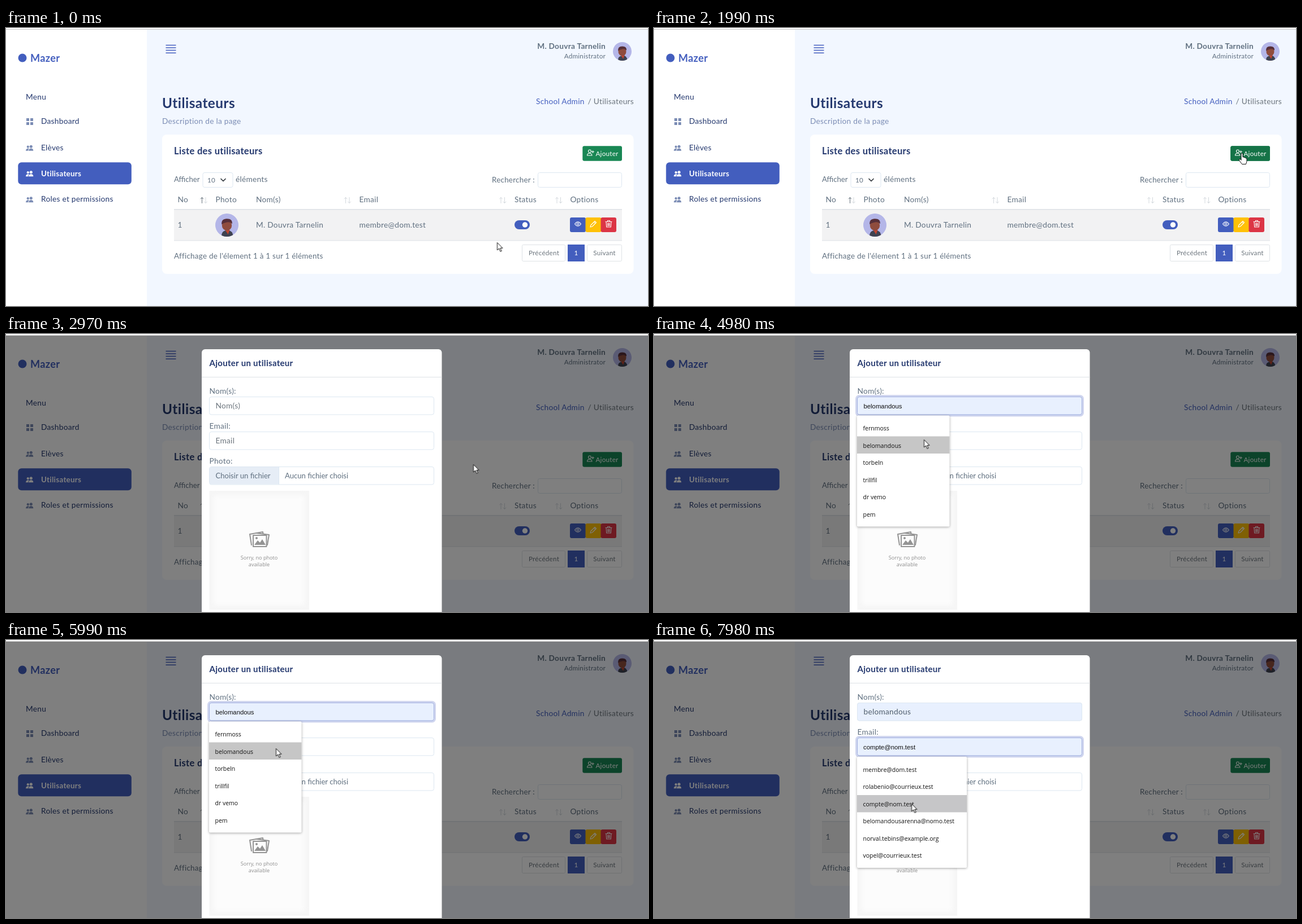
An HTML page for the animation above (8 s loop, 1135 by 493 pixels).

```html
<!DOCTYPE html>
<html lang="fr">
<head>
<meta charset="utf-8">
<title>Utilisateurs</title>
<style>
html, body { margin: 0; width: 100%; height: 100%; overflow: hidden; background: #f2f7ff; }
svg { display: block; }
#stage { width: 1135px; height: 493px; }
text { font: 13.7px Lato, sans-serif; letter-spacing: .02em; fill: #607080; white-space: pre; }
.bold { font-weight: 700; }
.nav { fill: #25396f; }
.blue { fill: #435ebe; }
.mute { fill: #7c8db5; }
.white { fill: #fff; }
.hint { fill: #6c757d; }
.end { text-anchor: end; }
.mid { text-anchor: middle; }
.h3 { font-size: 24.3px; }
.h4 { font-size: 16.5px; }
.h5 { font-size: 15px; }
.brand { font-size: 18.1px; }
.note { font-size: 13.4px; }
.file { font-size: 13.1px; letter-spacing: 0; }
.small { font-size: 11.7px; }
.native { font: 11.33px "Liberation Sans", Arial, sans-serif; letter-spacing: 0; fill: #111; }
.list text { font: 10.5px "Open Sans", sans-serif; letter-spacing: 0; fill: #111; }
.list > rect:first-child { fill: #fff; filter: drop-shadow(0 1px 2px rgba(0,0,0,.35)); }
.photo text { font: 9.1px "Open Sans", sans-serif; letter-spacing: 0; fill: #8d8d8d; }
.box { fill: #fff; stroke: #dce7f1; }
.page { fill: #fff; stroke: #dee2e6; }
.filled { fill: #e8f0fe; stroke: #dce7f1; }
.focus { fill: #e8f0fe; stroke: #a1afdf; }
.ring { fill: none; stroke: #435ebe; stroke-opacity: .25; stroke-width: 3.4; }
.line { fill: none; stroke-linecap: round; stroke-linejoin: round; }

/* every change is a hard cut */
.t { animation: 8s step-end infinite; }
#hover, #hand { animation-name: press; }
#modal { animation-name: modal; }
#beam { animation-name: beam; }
#click, #nameBlur { animation-name: click; }
#nameHint { animation-name: untilName; }
#namePick { animation-name: namePick; }
#nameDone, #mailList { animation-name: mail; }
#mailHint { animation-name: untilMail; }
#mailPick, #mailMark { animation-name: mailPick; }
#arrow { animation-name: arrow; }
@keyframes press { 0% { opacity: 0 } 24.875% { opacity: 1 } 37.125%, 100% { opacity: 0 } }
@keyframes modal { 0% { opacity: 0 } 37.125%, 100% { opacity: 1 } }
@keyframes untilName { 0% { opacity: 1 } 62.25%, 100% { opacity: 0 } }
@keyframes namePick { 0% { opacity: 0 } 62.25% { opacity: 1 } 87.375%, 100% { opacity: 0 } }
@keyframes mail { 0% { opacity: 0 } 87.375%, 100% { opacity: 1 } }
@keyframes click { 0% { opacity: 0 } 87.375% { opacity: 1 } 99.75%, 100% { opacity: 0 } }
@keyframes untilMail { 0% { opacity: 1 } 99.75%, 100% { opacity: 0 } }
@keyframes mailPick { 0% { opacity: 0 } 99.75%, 100% { opacity: 1 } }
@keyframes beam {
  0% { transform: translate(-50px, 0) }
  49.625% { transform: translate(500px, 127px) }
  62.25% { transform: translate(-50px, 0) }
  87.375% { transform: translate(455.5px, 185px) }
  99.75%, 100% { transform: translate(-50px, 0) }
}
@keyframes arrow {
  0% { transform: translate(868.5px, 380px) }
  12.5% { transform: translate(979.5px, 143px) }
  24.875% { transform: translate(-50px, 0) }
  37.125% { transform: translate(826.5px, 231px) }
  49.625% { transform: translate(-50px, 0) }
  62.25% { transform: translate(477.5px, 187px) }
  74.875% { transform: translate(477.5px, 192px) }
  87.375% { transform: translate(-50px, 0) }
  99.75%, 100% { transform: translate(455.5px, 290px) }
}
</style>
</head>
<body>
<svg id="stage" viewBox="0 0 1135 493">
<defs>
  <symbol id="people" viewBox="0 0 16 16">
    <circle cx="11" cy="5" r="3"/><path d="M6 14c0-7 10-7 10 0zM5.2 14c-.1-2 .6-3.6 1.8-4.7C4 8.3 0 9.6 0 14z"/><circle cx="4.5" cy="5.5" r="2.5"/>
  </symbol>
  <symbol id="avatar" viewBox="0 0 40 40">
    <clipPath id="round"><circle cx="20" cy="20" r="20"/></clipPath>
    <g clip-path="url(#round)">
      <rect width="40" height="40" fill="#b4b6e8"/>
      <path d="M11 40Q10 30 20 29T31 40z" fill="#3f4250"/>
      <path d="M17 28h8l-3 8z" fill="#c2452f"/>
      <ellipse cx="20" cy="20.5" rx="8.5" ry="9" fill="#8f4c3d"/>
      <path d="M11 19Q10 9 20 9T29 18Q26 14 20 15T11 19z" fill="#562f38"/>
    </g>
  </symbol>
  <g id="sort" class="line" stroke="currentColor">
    <path d="M3.5 11V1M1 3.5L3.5 1 6 3.5"/><path d="M10 1v10M7.500 8.500L10 11l2.500-2.500" stroke="#d3d8dd"/>
  </g>
</defs>

<rect width="1135" height="493" fill="#f2f7ff"/>
<rect width="249" height="493" fill="#fff"/>

<!-- sidebar -->
<circle cx="29" cy="53" r="7.5" class="blue"/>
<text x="43" y="60" class="bold blue brand">Mazer</text>
<text x="35" y="126.5" class="nav">Menu</text>
<g class="mute">
  <path d="M36 160h5v5h-5zM43 160h5v5h-5zM36 167h5v5h-5zM43 167h5v5h-5z"/>
  <use href="#people" x="35" y="206" width="13.5" height="13.5"/>
  <use href="#people" x="35" y="297.5" width="13.5" height="13.5"/>
</g>
<rect x="21.3" y="238.3" width="200.5" height="39" rx="6" class="blue"/>
<use href="#people" x="35" y="251.5" width="13.5" height="13.5" class="white"/>
<text x="62" y="170" class="nav">Dashboard</text>
<text x="62" y="216.5" class="nav">Elèves</text>
<text x="62" y="262.5" class="bold white note">Utilisateurs</text>
<text x="62" y="308" class="nav">Roles et permissions</text>

<!-- header -->
<path d="M282.5 30.5h18M282.5 35h18M282.5 39.5h18M282.5 44.3h18" stroke="#435ebe" stroke-width="1.5"/>
<text x="1060" y="36.5" class="bold end">M. Douvra Tarnelin</text>
<text x="1060" y="53.5" class="small end">Administrator</text>
<use href="#avatar" x="1073" y="25" width="33" height="33"/>
<text x="276" y="142" class="bold nav h3">Utilisateurs</text>
<text x="276" y="170" class="mute">Description de la page</text>
<text x="937" y="135" class="blue">School Admin</text>
<text x="1028.5" y="135" class="hint">/</text>
<text x="1110" y="135" class="hint end">Utilisateurs</text>

<!-- card -->
<rect x="276" y="189" width="833.5" height="247" rx="8" fill="#fff"/>
<text x="297" y="224" class="bold nav h4">Liste des utilisateurs</text>
<rect x="1019.3" y="209.3" width="69.7" height="26.5" rx="3" fill="#198754"/>
<rect id="hover" class="t" x="1019.3" y="209.3" width="69.7" height="26.5" rx="3" fill="#157347"/>
<g class="line" stroke="#fff" stroke-width="1.1">
  <circle cx="1032" cy="218.5" r="2.5"/><path d="M1027.5 226c0-5 8-5 8.5 0zM1037.5 217.5v4M1035.5 219.5h4"/>
</g>
<text x="1042.5" y="227" class="white small">Ajouter</text>
<text x="297" y="273" class="file">Afficher</text>
<rect x="348" y="256.5" width="53" height="26" rx="3" class="box"/>
<text x="356" y="273.5" class="small">10</text>
<path d="M380 267.5l4 4 4-4" class="line" stroke="#343a40" stroke-width="1.7"/>
<text x="406" y="273">éléments</text>
<text x="935" y="273.5" class="end note">Rechercher :</text>
<rect x="940.5" y="256.5" width="148" height="26" rx="3" class="box"/>

<!-- table -->
<rect x="297" y="321" width="792" height="56.5" fill="#dee2e6"/>
<rect x="297" y="322.5" width="792" height="54" fill="#f2f2f3"/>
<g class="bold">
  <text x="303.5" y="309">No</text><text x="370.5" y="309">Photo</text><text x="442" y="309">Nom(s)</text>
  <text x="624.5" y="309">Email</text><text x="899" y="309">Status</text><text x="997.5" y="309">Options</text>
</g>
<use href="#sort" x="343" y="299.5" color="#69747e"/>
<g color="#d3d8dd"><use href="#sort" x="597" y="299.5"/><use href="#sort" x="871.5" y="299.5"/><use href="#sort" x="970.5" y="299.5"/></g>
<text x="303.5" y="354">1</text>
<use href="#avatar" x="370" y="329" width="41" height="41"/>
<text x="442" y="354">M. Douvra Tarnelin</text>
<text x="624.5" y="354">membre@dom.test</text>
<rect x="899" y="341" width="27" height="16" rx="8" class="blue"/><circle cx="917.5" cy="349" r="4.7" class="white"/>
<rect x="997" y="336" width="28" height="26" rx="3" class="blue"/>
<rect x="1024.5" y="336" width="28" height="26" rx="3" fill="#ffc107"/>
<rect x="1051.5" y="336" width="27.5" height="26" rx="3" fill="#dc3545"/>
<g class="line" stroke="#fff" stroke-width="1.1">
  <path d="M1005.5 347.5q5.5-7.5 11 0-5.5 7.5-11 0z"/><circle cx="1011" cy="347.5" r="1.8"/>
  <path d="M1033 353l1-3.5 7-7 2.5 2.5-7 7zM1039.5 344l2.5 2.5"/>
  <path d="M1060 343.5h11M1063.5 343v-1.5h4v1.5M1061 344l.7 9h7.6l.7-9M1063.7 346v5M1065.5 346v5M1067.3 346v5"/>
</g>
<text x="297" y="409" class="note">Affichage de l'élement 1 à 1 sur 1 éléments</text>
<rect x="912.5" y="384.5" width="76" height="29" rx="2" class="page"/>
<rect x="993" y="384" width="30" height="30" class="blue"/>
<rect x="1027.5" y="384.5" width="61" height="29" rx="2" class="page"/>
<g class="mid">
  <text x="951" y="403" class="hint small">Précédent</text><text x="1008" y="403" class="white small">1</text><text x="1058" y="403" class="hint small">Suivant</text>
</g>

<!-- dialog -->
<g id="modal" class="t">
  <rect y="3" width="1135" height="490" opacity=".5"/>
  <rect x="346" y="27" width="424.5" height="480" rx="6" fill="#fff"/>
  <path d="M346 76.5h424.5" stroke="#dee2e6"/>
  <text x="359.5" y="57" class="bold nav h5">Ajouter un utilisateur</text>
  <text x="359.5" y="105.5">Nom(s):</text><text x="359.5" y="167.5">Email:</text><text x="359.5" y="229.5">Photo:</text>
  <rect x="359.5" y="111.5" width="397" height="31.5" rx="3.5" class="box"/>
  <rect x="359.5" y="173.5" width="397" height="31.5" rx="3.5" class="box"/>
  <rect x="359.5" y="235.5" width="397" height="31.5" rx="3.5" class="box"/>
  <path d="M482 236H363q-3 0-3 3v24.5q0 3 3 3h119z" fill="#e6edf6"/><path d="M482.5 236v31" stroke="#dce7f1"/>
  <text x="370.5" y="256" class="file">Choisir un fichier</text><text x="493" y="256" class="file">Aucun fichier choisi</text>

  <g class="photo">
    <rect x="359.5" y="278" width="176.5" height="211" fill="#f6f6f6"/>
    <rect x="367" y="286" width="161" height="195" fill="#fcfcfc" style="filter:blur(4px)"/>
    <g class="line" stroke="#949494" stroke-width="2">
      <path d="M434 374l-3-19 23-4 .5 3"/><path d="M442 353l23 3-3 18"/>
      <rect x="437" y="357" width="23.5" height="20" fill="#fcfcfc"/>
    </g>
    <path d="M439 374l6-8 4 4 4-6 6 10z" fill="#949494"/><circle cx="443" cy="362" r="2" fill="#949494"/>
    <text x="447.5" y="399.5" class="mid">Sorry, no photo</text><text x="447.5" y="411.5" class="mid">available</text>
  </g>

  <text id="nameHint" class="t hint" x="370.5" y="132">Nom(s)</text>
  <text id="mailHint" class="t hint" x="370.5" y="194">Email</text>

  <g id="namePick" class="t">
    <rect x="357.7" y="109.7" width="400.6" height="35.1" rx="5" class="ring"/>
    <rect x="359.5" y="111.5" width="397" height="31.5" rx="3.5" class="focus"/>
    <text x="370.5" y="131.5" class="native">belomandous</text>
    <g class="list">
      <rect x="359" y="144.5" width="163.5" height="197" rx="2"/>
      <rect x="359" y="181.5" width="163.5" height="30.5" fill="#c6c6c6"/>
      <text y="171"><tspan x="369.5">fernmoss</tspan><tspan x="369.5" dy="30.5">belomandous</tspan><tspan x="369.5" dy="30.5">torbeln</tspan><tspan x="369.5" dy="30.5">trillfil</tspan><tspan x="369.5" dy="30.5">dr vemo</tspan><tspan x="369.5" dy="30.5">pem</tspan></text>
    </g>
  </g>
  <g id="nameDone" class="t">
    <rect x="359.5" y="111.5" width="397" height="31.5" rx="3.5" class="filled"/>
    <g id="nameBlur" class="t">
      <rect x="358" y="110" width="400" height="34.5" rx="5" class="ring" style="stroke-width:2.6px"/>
      <rect x="359.5" y="111.5" width="397" height="31.5" rx="3.5" class="focus"/>
    </g>
    <text x="370.5" y="132" style="fill:#4f5d6b">belomandous</text>
  </g>

  <g id="mailPick" class="t">
    <rect x="357.7" y="171.7" width="400.6" height="35.1" rx="5" class="ring"/>
    <rect x="359.5" y="173.5" width="397" height="31.5" rx="3.5" class="focus"/>
    <text x="370" y="193.5" class="native">compte@nom.test</text>
  </g>
  <g id="mailList" class="t list">
    <rect x="359" y="207" width="194" height="197" rx="2"/>
    <rect id="mailMark" class="t" x="359" y="275" width="194" height="30.5" fill="#c6c6c8"/>
    <text y="233.5"><tspan x="369.5">membre@dom.test</tspan><tspan x="369.5" dy="30.5">rolabenio@courrieux.test</tspan><tspan x="369.5" dy="30.5">compte@nom.test</tspan><tspan x="369.5" dy="30.5">belomandousarenna@nomo.test</tspan><tspan x="369.5" dy="30.5">norval.tebins@example.org</tspan><tspan x="369.5" dy="30.5">vopel@courrieux.test</tspan></text>
  </g>
  <g id="click" class="t">
    <rect x="359.5" y="173.5" width="397" height="31.5" rx="3.5" fill="none" stroke="#becbe8"/>
    <path d="M370.5 180v18" stroke="#333"/>
    <circle cx="454.5" cy="185" r="10" fill="#fff04a" fill-opacity=".85"/>
  </g>
</g>

<rect width="1135" height="2" fill="#fff"/><rect y="2" width="1135" height="1" fill="#c4c4c4"/>

<!-- pointers -->
<path id="beam" class="t line" d="M-3.5-7.5h2.5l1 1 1-1h2.5M0-6.5v13M-3.5 7.5h2.5l1-1 1 1h2.5" stroke="#222"/>
<path id="arrow" class="t" d="M0 .5v13.5l3.2-3 2.3 5.5 2.2-1-2.3-5.2h4.1z" fill="#fff" stroke="#111"/>
<path id="hand" class="t line" d="M1038 234v-10q0-2 1.5-2t1.5 2v5q2.5-1 2.7 1 2-.8 2.3.8 2-.4 2 1.7v4l-1.5 5h-7l-5-7q-.5-2.5 1.5-2z" stroke="#111" style="fill:#fff"/>
</svg>
</body>
</html>
```
